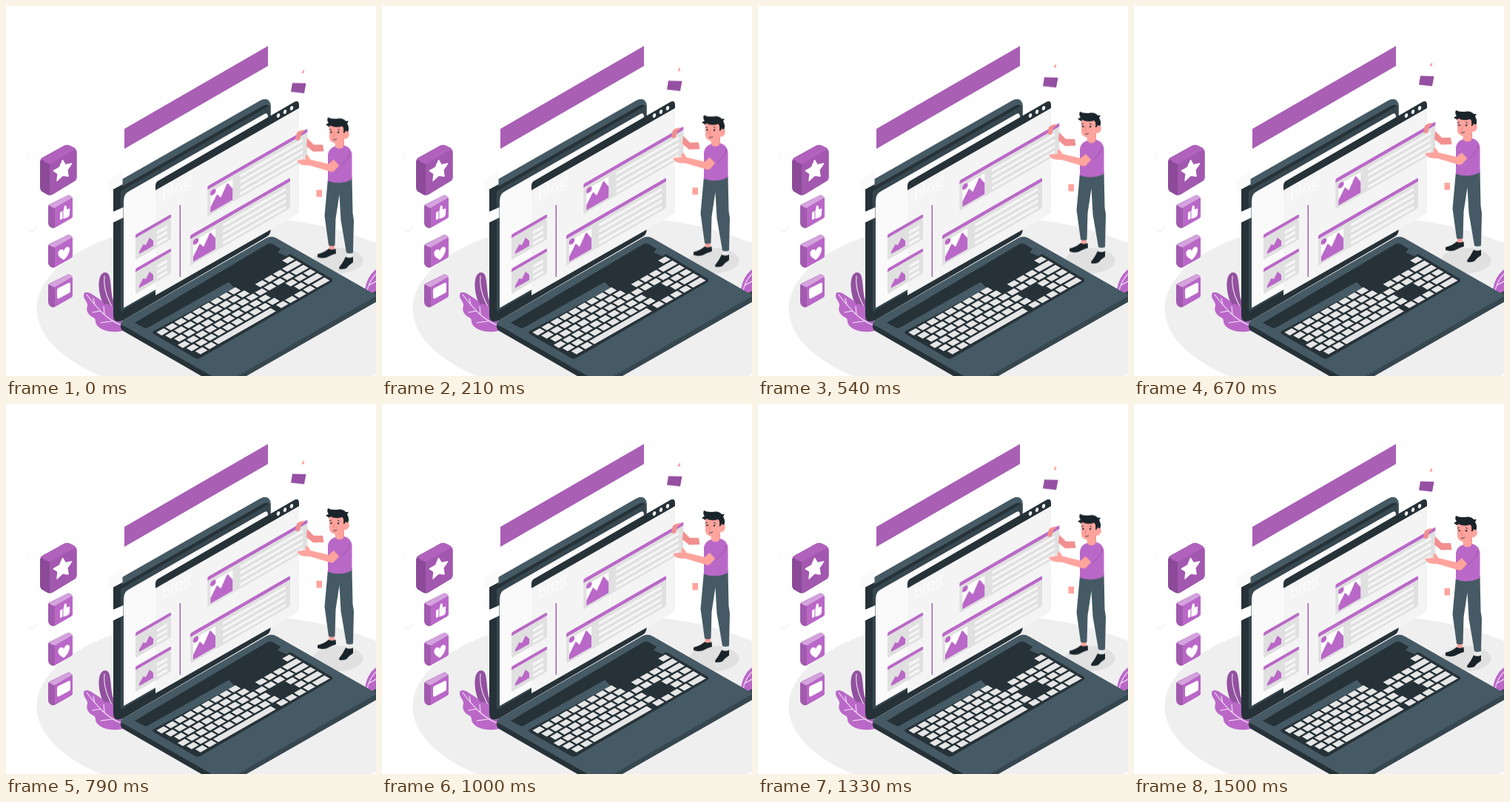
Recreate the animation shown at these times as an HTML page. Size 500 by 500 pixels, loop 1540 ms.

```html
<!DOCTYPE html>
<html lang="en">
<head>
<meta charset="utf-8">
<title>Blog building</title>
<style>
  html, body { margin: 0; width: 100%; height: 100%; overflow: hidden; background: #fff; }
  svg { display: block; width: 100vw; height: 100vh; }
  .float { animation: float 1540ms linear infinite; }
  @keyframes float {
    0% { transform: translateY(-.6px); }
    47.4% { transform: translateY(-11px); }
    97.4%, 100% { transform: translateY(0); }
  }
  .dark { fill: #263238; }
  .edge { fill: #37474f; }
  .slate { fill: #455a64; }
  .violet { fill: #a85fb4; }
  .lilac { fill: #ba68c8; }
  .skin { fill: #ffa39d; }
  .shade { fill: #f28f8f; }
  .grey { fill: #e0e0e0; }
  .white { fill: #fff; }
  .vein { fill: none; stroke: #f3e3f6; stroke-width: 1.1; stroke-linecap: round; }
  .lines { fill: none; stroke: #f5f5f5; stroke-width: 4; }
</style>
</head>
<body>
<svg viewBox="0 0 500 500">
  <defs>
    <g id="post">
      <rect class="grey" width="135" height="41" rx="2"/>
      <path class="lilac" d="M0 5V2Q0 0 2 0H133Q135 0 135 2V5Z"/>
      <rect class="white" x="4" y="10" width="30" height="28"/>
      <path class="lilac" d="M4 38V31L12 19.500Q13 18 14 20L18 26L26 12.500Q27 11 28 13L34 23V38Z"/>
      <circle class="lilac" cx="7.500" cy="12.500" r="3.800"/>
      <path class="lines" d="M44 12H129M44 20H129M44 28H129M44 36H129"/>
    </g>
    <g id="mini">
      <rect class="grey" width="48" height="34" rx="1.500"/>
      <path class="lilac" d="M0 4.500V2Q0 0 2 0H46Q48 0 48 2V4.500Z"/>
      <path class="lilac" d="M5 29V26L10.500 19L14 22L19 15L24 22V29Z"/>
      <path class="lines" d="M29 14H43M29 21.500H43M29 29H43"/>
    </g>
    <g id="tile">
      <path d="M57 271Q57 269 59 268L83 256Q85 255 87 256.500Q90 258 90 262V283Q90 286 87 287.500L66 299.500Q64 301 61 299.500Q57 297 57 293Z" fill="#a15aad"/>
      <path d="M58 269L83 256Q85 255 87 256.500L90 259L66 273Q61 272 58 269Z" fill="#d4a2dd"/>
      <path class="lilac" d="M66 275Q66 273 68 272L88 260.500Q90 259.500 90 262V283Q90 286 87 287.500L66 299.500Z"/>
    </g>
  </defs>

  <ellipse cx="311" cy="409" rx="269.500" ry="124" fill="#efefef"/>
  <ellipse cx="449" cy="344" rx="33.500" ry="17" fill="#e0e0e0"/>
  <path d="M28.500 197L32 199V210L28.500 208Z" fill="#fafafa"/>
  <path d="M30 302L36 305L43 296" fill="none" stroke="#e9e9e9"/>
  <path class="violet" d="M160 166L354 54V81L160 193Z"/>

  <!-- plants -->
  <path d="M148 424C132 412 123 387 126 370C128 358 138 357 140 366C143 380 141 396 149 404Z" fill="#92519e"/>
  <path class="vein" d="M133 365C131 385 140 402 148 414" stroke="#a566b2"/>
  <path class="lilac" d="M158 439C140 443 126 437 122 430C120 426 122 423 118 421C110 417 108 411 110 405C111 400 104 396 105 390C106 384 114 387 120 392C128 397 131 399 133 403C139 402 148 406 148 415C156 420 160 431 158 439Z"/>
  <path class="vein" d="M109 390C123 408 136 424 157 432M120 404L118 395M133 417L132 406M117 414L128 412M128 428L143 426"/>
  <path class="lilac" d="M485 386C486 373 491 363 500 356V394Z"/>
  <path class="vein" d="M488 385C490 375 495 367 500 362M491 377L500 372"/>

  <!-- laptop base -->
  <path class="edge" d="M300 495L500 385V400L325 500H285Z"/>
  <path class="dark" d="M155 430L300 495V500H264L159 439.500Q154 437 155 430Z"/>
  <path class="slate" d="M157 431Q153 428 158 425L352 313.500Q359 310 366 314L500 390.500V392L306 504H285L157 431Z"/>
  <path class="dark" d="M174 428L353 322Q357 320 361 322L371 328L367 333L379 338L384 335L441 369Q442 371 440 373L262 476Q259 477 256 476L199 443Q197 441 200 439L309 381L301 373L191 435Q188 436 185 434Z"/>
  <g id="keys" fill="#e6e6e6"></g>

  <!-- laptop lid -->
  <path class="dark" d="M145 247L157 240L344 132Q357 124 357.500 137V304Q357 309 352 312L158 425Q145 430 145 418Z"/>
  <path class="edge" d="M155 250L357.500 134V297L155 413Z"/>
  <path class="slate" d="M157 234L343 128Q354 122 357.500 132V137Q354 131 347 135L157 244Z"/>
  <path d="M159 264Q159 254 166 250.500L349 146Q354 143.500 354 150V296L159 408Z" fill="#fafafa"/>
  <path d="M138 234L157.500 224V241L138 251.500Z" fill="#fafafa"/>
  <path class="white" d="M138 281L158.500 272V286L138 296Z"/>

  <!-- browser page -->
  <path d="M202 245L396 136V277Q396 280 393 282L202 391Z" fill="#f4f4f4"/>
  <path class="dark" d="M202 249V243Q202 238 206 236L390 129.500Q396 127 396 134V138Z"/>
  <g class="white">
    <ellipse cx="368" cy="148" rx="2" ry="3" transform="rotate(20 368 148)"/>
    <ellipse cx="377" cy="143" rx="2" ry="3" transform="rotate(20 377 143)"/>
    <ellipse cx="386" cy="138" rx="2" ry="3" transform="rotate(20 386 138)"/>
  </g>
  <text transform="matrix(.87 -.502 0 1 210.500 265)" font-family="Lato, Open Sans, sans-serif" font-size="24" font-weight="700" fill="#fafafa">blog</text>
  <path d="M235.300 269V366" stroke="#a85fb4" stroke-width="1.500"/>
  <use href="#mini" transform="matrix(1 -.577 0 1 175 309)"/>
  <use href="#mini" transform="matrix(1 -.577 0 1 175 355)"/>
  <use href="#post" transform="matrix(1 -.577 0 1 249 310)"/>

  <!-- icon tiles -->
  <path d="M46 210Q46 207 49 205L78 189Q82 187 86 188.500L92 191.500Q95.500 194 95.500 198V231Q95.500 235 92 237L63 254.500Q59 257 55 254.500L49 251Q46 249 46 245Z" fill="#8c4a98"/>
  <path d="M47 207L78 189Q82 187 86 188.500L92 191.500Q94 193 95 195L60 214Q52 211 47 207Z" fill="#b062bd"/>
  <path d="M59 217Q59 214 62 212L91 195Q95.500 193 95.500 198V231Q95.500 235 92 237L63 254.500Q59 257 59 252Z" fill="#a258ae"/>
  <path id="star" class="white" stroke="#fff" stroke-width="1.500" stroke-linejoin="round"/>
  <use href="#tile"/>
  <use href="#tile" y="53.500"/>
  <use href="#tile" y="107"/>
  <path class="white" d="M73 279L76.500 277V287.500L73 289ZM77.500 277L79 270Q82 268 82 273V275L85.500 273.500Q87 274 86 276.500V282Q85 285 82 286L77.500 287.500Z"/>
  <path class="white" d="M78 343C72 340 69 336 71 332C73 328 77 328 78 331C80 325 85 323 86 328C86 334 82 340 78 343Z"/>
  <path class="white" d="M69 384Q69 382 71 381L85 374Q87 373.500 87 376V385Q87 387 85 388L71 395.500Q69 396 69 393Z"/>

  <!-- moving post and builder -->
  <g class="float">
    <use href="#post" transform="matrix(1 -.577 0 1 272.300 244)"/>
    <path class="skin" d="M399 91L403 86V91.500Z"/>
    <path d="M387 104.500L405.500 105L403 118.500L385 116.500Z" fill="#9550a2"/>
    <path class="skin" d="M419.500 249H427V258.500H419.500Z"/>
    <path class="shade" d="M391 181L393 172Q395 169 402 168L403 170L399 173L397 181Q394 183 391 181Z"/>
    <path class="shade" d="M407 179L416 188L428 188L429.500 197L415 197.500L406 190Z"/>

    <path class="skin" d="M437 321H444V331H436.500Z"/>
    <path d="M461 332H468.500V342H460Z" fill="#e8eaeb"/>
    <path d="M421 336Q430 334 436 328.500Q440 331 445.500 328.500L446 335Q439 337 433 340.500Q426 342 421 340Z" fill="#19242a"/>
    <path d="M450 354Q455 348 459 339.500Q464 342 469 339.500V347Q464 350 460 355Q455 357 450.500 356Z" fill="#19242a"/>
    <path class="slate" d="M435 234L467.500 232L468.500 280L470 290L469 334Q464 336 460 334L452.500 290L450.500 255L445.500 288L444.500 324Q440 326 436 324L430.500 284Z"/>

    <path class="shade" d="M445 180L457 178V194Q451 198 445 193Z"/>
    <path class="lilac" d="M435 201Q436 193 445 190Q451 196 457 189Q466 191 467.500 201V235Q452 243 435 237Z"/>
    <path class="skin" d="M444 181H456V191Q451 196 445 191Z"/>
    <path class="skin" d="M393 210Q394 208 405 208Q404 204 406 201.500Q410 204 411 208L436 214L443 208L452 214L443 224Q440 225 437 224L410 216Q400 216 397 214Z"/>
    <path class="lilac" d="M441 206Q446 199 457 196L464 198Q465 204 451 217Z"/>
    <path d="M452 217Q464 207 465 198" fill="none" stroke="#9552a2" stroke-width=".9"/>

    <path class="skin" d="M436.500 162Q448 158 459 164Q464 168 463.500 176Q461 181 457 180Q456 186 447 186Q438 186 437 179Z"/>
    <path d="M432 161L436 158.500Q433 156 435 151Q440 154 450 152.500Q456 152 459 156L463 156L461 159Q465 167 461.500 171L459 169Q458 173 456 172Q457 164 454 163Q446 166 438 162L437 164Z" fill="#19242a"/>
    <path class="skin" d="M457 173Q460 168 463 171Q465 175 461 178.500L457 179Z"/>
    <circle class="dark" cx="439.500" cy="171" r="1.200"/>
    <circle class="dark" cx="449" cy="171.300" r="1.200"/>
    <path d="M437 168L440 167M448 167L451 168.500M442 181Q445 182 447 180" fill="none" stroke="#263238" stroke-width=".9"/>
    <path d="M443.500 171L442 177H444" fill="none" stroke="#e57f79" stroke-width=".8"/>
  </g>
</svg>
<script>
  // Keyboard plane: a runs along the rows, b across them.
  const at = (a, b) => [201 + 182 * a + 57 * b, 441 - 104 * a + 34 * b].map(n => n.toFixed(1)).join(' ');
  const key = (a0, a1, b0, b1) => `M${at(a0, b0)}L${at(a1, b0)}L${at(a1, b1)}L${at(a0, b1)}Z`;
  const hidden = (r, c) =>
    (r === 0 && c > 8 && c < 14) || (r === 1 && c === 9) ||
    ((r === 3 || r === 4) && c > 9 && c < 12) || (r === 5 && c > 2 && c < 9);
  let d = key(3.1 / 15, 8.9 / 15, 5.12 / 6, 5.88 / 6);
  for (let r = 0; r < 6; r++)
    for (let c = 0; c < 15; c++) {
      const shift = r === 0 || c === 14 ? 0 : (r % 3) * .2;
      if (!hidden(r, c)) d += key((c + .1 + shift) / 15, Math.min(15, c + .9 + shift) / 15, (r + .12) / 6, (r + .86) / 6);
    }
  document.getElementById('keys').innerHTML = `<path d="${d}"/>`;

  const star = Array.from({ length: 10 }, (_, i) => {
    const r = i % 2 ? 7 : 13.5, t = i * Math.PI / 5 - Math.PI / 2;
    const x = r * Math.cos(t) * .95;
    return [76.5 + x, 222 + r * Math.sin(t) - x * .4].map(n => n.toFixed(1)).join(' ');
  });
  document.getElementById('star').setAttribute('d', `M${star.join('L')}Z`);
</script>
</body>
</html>
```
